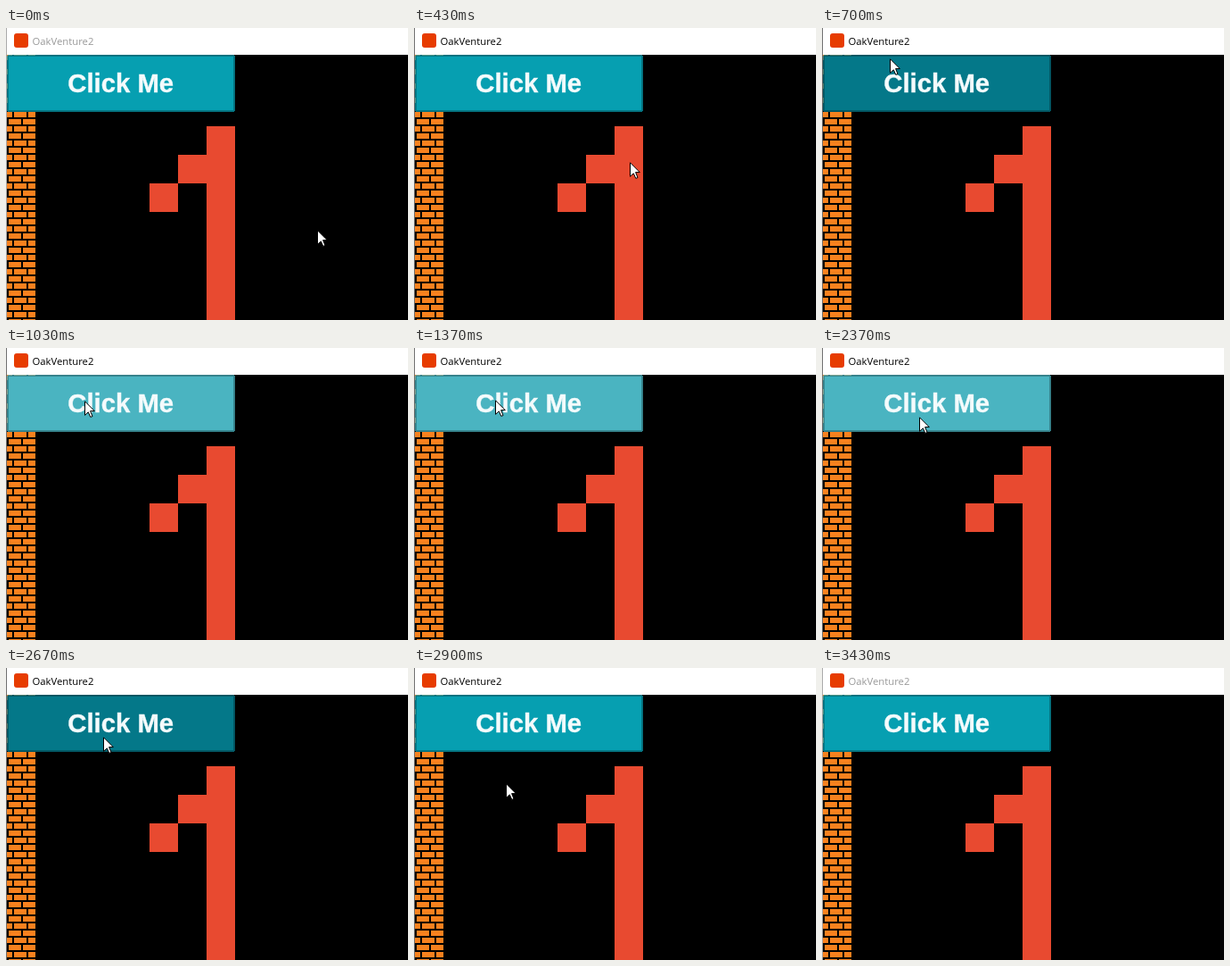
These frames come from a looping animation (451 by 327 pixels, 3510 ms). An HTML page:

```html
<!DOCTYPE html>
<html lang="en">
<head>
<meta charset="utf-8">
<title>Button states</title>
<style>
  html, body { margin: 0; width: 100%; height: 100%; overflow: hidden; background: #000; }
  svg { display: block; width: 451px; height: 327px; }
  .title { font: 11.3px "Open Sans", "Noto Sans", sans-serif; }
  .label {
    font: bold 29.3px "Liberation Sans", Arial, sans-serif;
    fill: #f4fbfc; stroke: #f4fbfc; stroke-width: .4; text-anchor: middle;
  }
</style>
</head>
<body>
<svg viewBox="0 0 451 327">
  <defs>
    <pattern id="bricks" x="1" y="30" width="16" height="16" patternUnits="userSpaceOnUse">
      <path fill="#f8811e" shape-rendering="crispEdges" d="M0 0h6v6h-6z M8 0h8v6h-8z M2 8h14v6h-14z"/>
    </pattern>
  </defs>
  <rect width="451" height="327"/>
  <rect width="451" height="30" fill="#fff"/>
  <rect id="edge" width="1" height="327"/>
  <rect x="9" y="6" width="16" height="16" rx="3" fill="#e73c00"/>
  <text id="title" class="title" x="29.5" y="19">OakVenture2</text>

  <rect x="1" y="30" width="32" height="297" fill="url(#bricks)"/>
  <path fill="#e84a30" shape-rendering="crispEdges"
    d="M225 110h32v217h-32v-153h-32v-32h32z M161 174h32v32h-32z"/>

  <g shape-rendering="crispEdges" fill="none">
    <rect id="face" x="2" y="31" width="254" height="62"/>
    <path id="rim" stroke-opacity=".7" d="M2 30.5H256 M2 93.5H256 M1.5 31V93 M256.5 31V93"/>
    <rect x="2.5" y="31.5" width="253" height="61" stroke="#000" stroke-opacity=".25"/>
  </g>
  <text class="label" x="128.7" y="72">Click Me</text>

  <path id="cursor" fill="#fff" stroke="#000"
    d="M.5 .8V16.3L4.3 12.8L6.8 18.4L9 17.5L6.6 11.6H11.3Z"/>
</svg>
<script>
  const LOOP = 3510;
  const TICKS_PER_MS = 0.03; // pointer is sampled 30 times a second
  const COLORS = { normal: '#069fb1', hover: '#4ab4c1', pushed: '#047889' };

  const smooth = k => k * k * (3 - 2 * k);
  const linear = k => k;

  // Pointer strokes in ticks; it rests between them
  const START = { x: 349, y: 226 };
  const STROKES = [
    { from: 7, to: 21, x: 76, y: 34, ease: smooth },   // drag onto the button
    { from: 22, to: 31, x: 88, y: 59, ease: smooth },  // settle on the label
    { from: 31, to: 41, x: 91, y: 58, ease: linear },
    { from: 42, to: 56, x: 112, y: 201, ease: smooth }, // leave downwards
    { from: 61, to: 71, x: 109, y: 77, ease: smooth },  // come back
    { from: 85, to: 96, x: 76, y: 363, ease: linear }   // leave the window
  ];
  const DRAG = [3, 26];
  const CLICK = [80, 82];
  const ACTIVE = [3, 103];

  const $ = id => document.getElementById(id);
  const [edge, title, face, rim, cursor] = ['edge', 'title', 'face', 'rim', 'cursor'].map($);
  const within = (v, [from, to]) => v >= from && v < to;

  function pointerAt(tick) {
    let { x, y } = START;
    for (const s of STROKES) {
      if (tick <= s.from) break;
      const k = s.ease(Math.min(1, (tick - s.from) / (s.to - s.from)));
      x += (s.x - x) * k;
      y += (s.y - y) * k;
    }
    return [Math.round(x), Math.round(y)];
  }

  function buttonState(tick, x, y) {
    if (!within(x, [1, 257]) || !within(y, [30, 94])) return 'normal';
    return within(tick, DRAG) || within(tick, CLICK) ? 'pushed' : 'hover';
  }

  function draw(ms) {
    const tick = Math.floor((ms + 4) * TICKS_PER_MS);
    const [x, y] = pointerAt(tick);
    const color = COLORS[buttonState(tick, x, y)];
    const active = within(tick, ACTIVE);
    face.setAttribute('fill', color);
    rim.setAttribute('stroke', color);
    title.setAttribute('fill', active ? '#000' : '#999');
    edge.setAttribute('fill', active ? '#707070' : '#aaa');
    cursor.setAttribute('transform', `translate(${x} ${y})`);
  }

  const start = performance.now();
  function frame() {
    draw((performance.now() - start) % LOOP);
    requestAnimationFrame(frame);
  }
  draw(0);
  requestAnimationFrame(frame);
</script>
</body>
</html>
```
